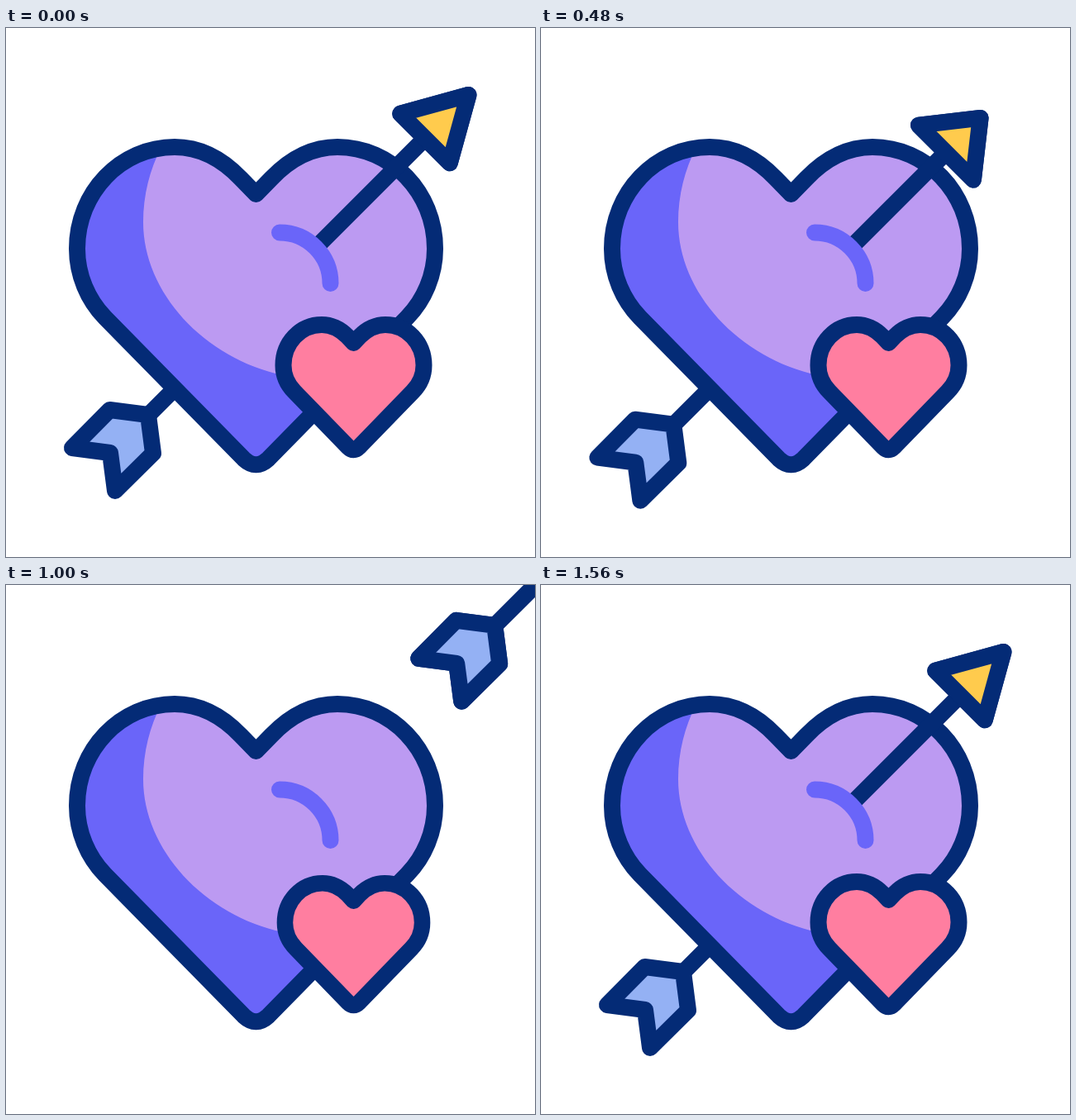
Recreate the animation shown at these times as an HTML page with a canvas. Size 640x640 px, loop 2000 ms.

```html
<!DOCTYPE html>
<html>
<head>
<meta charset="utf-8">
<style>
html, body { margin: 0; height: 100%; overflow: hidden; background: #fff; }
canvas { display: block; width: 100vmin; height: 100vmin; }
</style>
</head>
<body>
<canvas id="stage" width="640" height="640"></canvas>
<script>
const ctx = document.getElementById('stage').getContext('2d');
const NAVY = '#042b76', LAVENDER = '#bc9af2', INDIGO = '#6a65f9';
const PINK = '#ff7ea0', YELLOW = '#ffcb4d', SKY = '#94b1f4';
const LOOP = 2000, STEP = 40;

const bigHeart = new Path2D(`M302.5 201 L284 182 C262 159 235 144 204 144 C139 144 86 199 86 267
  C86 299 99 329 119.7 350.3 L287.7 521.3 Q302.5 535 317.3 521.3 L485.3 350.3 C506 329 519 299 519 267
  C519 199 466 144 401 144 C370 144 343 159 321 182Z`);
const smallHeart = new Path2D(`M420.5 381 L413 373 C404 364 394 359 382 359 C356 359 335.5 381 335.5 408
  C335.5 421 341 432 349 440 L414 507 Q420.5 513.5 427 507 L492 440 C500 432 505.5 421 505.5 408
  C505.5 381 485 359 459 359 C447 359 437 364 428 373Z`);
const shade = new Path2D(`M188 144 C174 171 166 202 166 235 C166 320 240 400 335 420
  C357 425 385 427 420 424 V560 H60 V144Z`);
const glint = new Path2D('M331 247.5 A61.5 61.5 0 0 1 392.5 309');
const fletch = new Path2D('M125.5 462 L172 468 L178 514.5 L132 560 L126 514 L80 508Z');
const frontSide = new Path2D('M112 0 L752 640 V-100 H112Z');

const clamp = x => Math.min(1, Math.max(0, x));
const span = (t, from, to) => clamp((t - from) / (to - from));
const smooth = x => x * x * (3 - 2 * x);
const cubic = x => x < .5 ? 4 * x ** 3 : 1 - 4 * (1 - x) ** 3;

// One shrink-and-return between two times
function beat(t, from, to, depth) {
  const x = span(t, from, to);
  return depth * cubic(1 - Math.abs(2 * x - 1));
}

function arrowPose(t) {
  if (t < 1080) {
    const pull = 1 - (1 - span(t, 160, 720)) ** 2;
    const flight = 433.5 * (Math.max(0, t - 720) / 280) ** 1.56;
    return {
      tail: flight - 14.3 * pull,
      head: flight - 20.9 * pull,
      half: 29.8 + 3.9 * pull,
      length: 52.5 - 13.3 * pull
    };
  }
  const shift = t < 1400
    ? 8 - 696 * (1 - span(t, 1080, 1400)) ** 1.5
    : 8 * (1 - smooth(span(t, 1400, 1560)));
  const stretch = 1 - span(t, 1200, 1400);
  return { tail: shift, head: shift, half: 29.8 - 4.5 * stretch, length: 52.5 - 2.5 * stretch };
}

function outline(path) {
  ctx.strokeStyle = NAVY;
  ctx.stroke(path);
}

function fill(path, color) {
  ctx.fillStyle = color;
  ctx.fill(path);
}

function buildArrow({ tail, head, half, length }) {
  const x = 507 + head, y = 133.5 - head;
  const tip = new Path2D();
  tip.moveTo(x - half, y - half);
  tip.lineTo(x + length, y - length);
  tip.lineTo(x + half, y + half);
  tip.closePath();
  const shaft = new Path2D();
  shaft.moveTo(172 + tail, 468.5 - tail);
  shaft.lineTo(x, y);
  const feathers = new Path2D();
  feathers.addPath(fletch, new DOMMatrix().translate(tail, -tail));
  return { tip, shaft, feathers };
}

function fillArrow(arrow) {
  fill(arrow.tip, YELLOW);
  fill(arrow.feathers, SKY);
}

function drawArrow(arrow) {
  outline(arrow.shaft);
  fillArrow(arrow);
  outline(arrow.tip);
  outline(arrow.feathers);
}

function scaleAbout(x, y, s) {
  ctx.translate(x, y);
  ctx.scale(s, s);
  ctx.translate(-x, -y);
}

function draw(t) {
  const bigScale = 1 - beat(t, 160, 480, .041) - beat(t, 480, 800, .045);
  const smallScale = 1 - beat(t, 780, 1060, .073) - beat(t, 1060, 1340, .073);
  const arrow = buildArrow(arrowPose(t));

  ctx.fillStyle = '#fff';
  ctx.fillRect(0, 0, 640, 640);
  ctx.lineWidth = 20;
  ctx.lineJoin = ctx.lineCap = 'round';

  drawArrow(arrow);

  // Inside the heart only the arrow's fills show, beneath the shade
  ctx.save();
  scaleAbout(302.5, 336, bigScale);
  const heartSpace = ctx.getTransform();
  fill(bigHeart, LAVENDER);
  ctx.clip(bigHeart);
  ctx.resetTransform();
  fillArrow(arrow);
  ctx.setTransform(heartSpace);
  fill(shade, INDIGO);
  ctx.restore();

  ctx.save();
  scaleAbout(302.5, 336, bigScale);
  outline(bigHeart);
  ctx.restore();

  ctx.save();
  ctx.clip(frontSide);
  drawArrow(arrow);
  ctx.restore();

  ctx.strokeStyle = INDIGO;
  ctx.stroke(glint);

  ctx.save();
  scaleAbout(420.5, 435, smallScale);
  fill(smallHeart, PINK);
  outline(smallHeart);
  ctx.restore();
}

const start = performance.now();
function tick() {
  const t = (performance.now() - start) % LOOP;
  draw(Math.floor(t / STEP) * STEP);
  requestAnimationFrame(tick);
}
tick();
</script>
</body>
</html>
```
